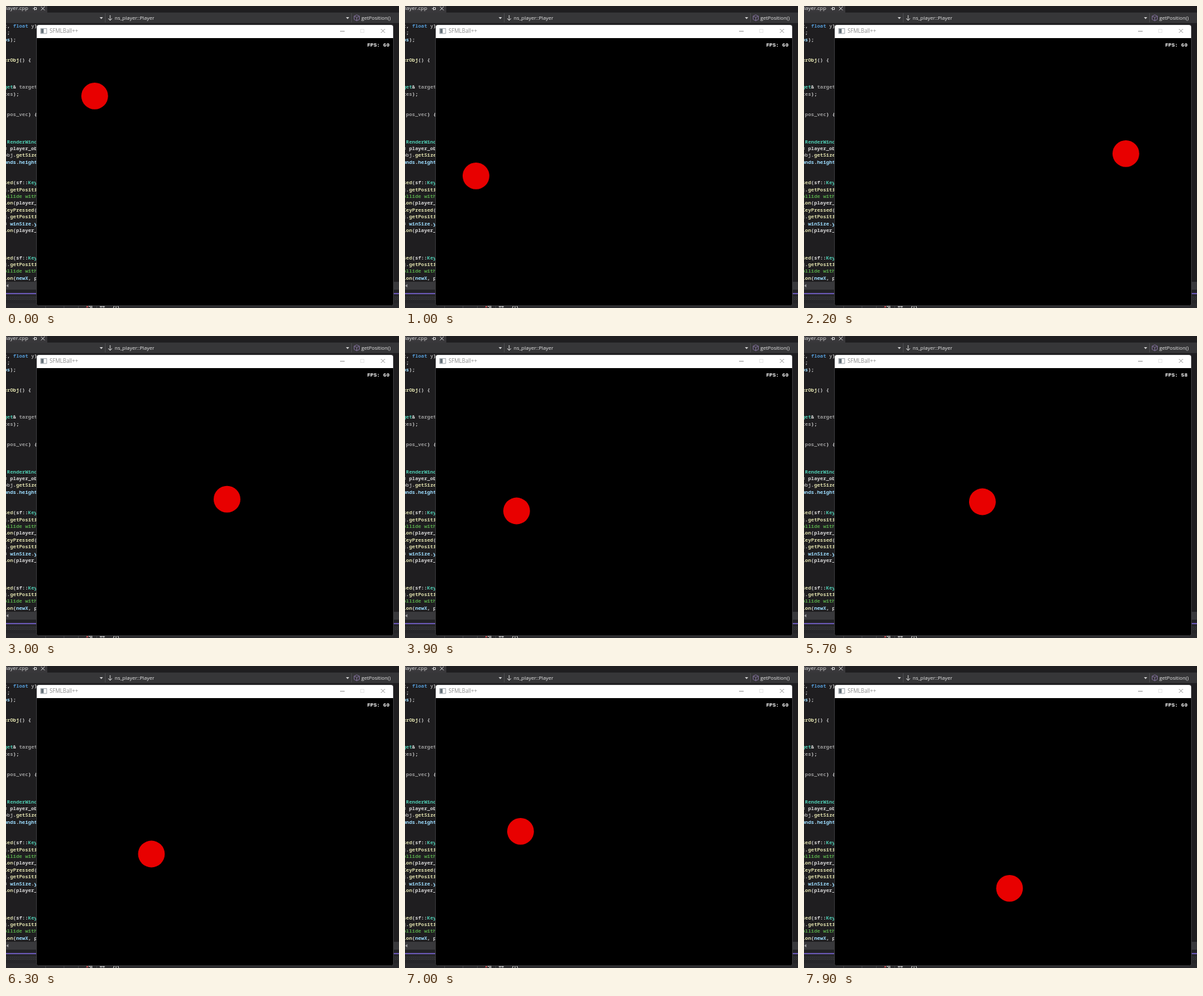
Animation of 600 by 461 pixels, one loop 8000 ms. Source, as an HTML page:

```html
<!DOCTYPE html>
<html lang="en">
<head>
<meta charset="utf-8">
<title>SFMLBall++</title>
<style>
html, body { margin: 0; width: 100%; height: 100%; overflow: hidden; background: #1f1e20; }
svg { display: block; width: 600px; height: 461px; }
text { white-space: pre; fill: #e6e6e6; font: 7.7px "Open Sans", "Noto Sans", sans-serif; }
#code text { font: 600 7.67px "Noto Sans Mono", "DejaVu Sans Mono", monospace; }
#fps { font: bold 8.1px "Liberation Mono", monospace; fill: #fff; }
.line { fill: none; stroke: #d6d6d6; stroke-width: 1; }
</style>
</head>
<body>
<svg viewBox="0 0 600 461">
  <defs>
    <pattern id="dots" width="3" height="3" patternUnits="userSpaceOnUse">
      <path d="M0 0h1v1h-1zM1.5 1.5h1v1h-1z" fill="#444448"/>
    </pattern>
  </defs>

  <!-- editor -->
  <rect width="600" height="461" fill="#1f1e20"/>
  <rect width="63" height="10" fill="#39383b"/>
  <rect y="10" width="600" height="16" fill="#363638"/>
  <path d="M151.500 11v14M527.500 11v14" stroke="#4b4b4e"/>
  <path d="M143 17h5l-2.500 3zM519 17h5l-2.500 3z" fill="#d0d0d0"/>
  <text x="-5" y="6.300" style="font-size:8px">player.cpp</text>
  <path class="line" d="M41 4h2.500M43.500 1.500v5M43.500 2.500h3v3h-3M53.500 1l5.500 5.500M59 1l-5.500 5.500"/>
  <path class="line" d="M159 14v8M156 19l3 3l3-3"/>
  <text x="166" y="21">ns_player::Player</text>
  <path d="M535.500 13.500l4 2v5l-4 2l-4-2v-5zM531.500 15.500l4 2l4-2M535.500 17.500v5" fill="none" stroke="#8f78ad" stroke-width=".8"/>
  <text x="542.500" y="21">getPosition()</text>
  <g id="code"></g>

  <!-- lower panels -->
  <rect y="421" width="600" height="12" fill="#39393c"/>
  <path d="M3.500 424.500v5l-3-2.500z" fill="#a5a5a8"/>
  <rect y="433" width="600" height="5" fill="#222225"/>
  <rect y="438" width="600" height="2" fill="#6655ad"/>
  <rect y="440" width="600" height="14" fill="#252528"/>
  <rect y="443" width="600" height="6" fill="url(#dots)"/>
  <rect y="454" width="600" height="7" fill="#2a2a2d"/>
  <path d="M60.500 456v5M88.500 456v5M110.500 456v5M138.500 456v5" stroke="#444448"/>
  <path class="line" d="M126 458.500h6M128 460.500h4M143 459h8M145 457.500v3M149 457.500v3M164 461a4 4 0 0 1 8 0M168 458v3"/>
  <path d="M122.500 457.500l3 3M125.500 457.500l-3 3" stroke="#d8565b"/>

  <!-- game window -->
  <rect x="46.500" y="28.500" width="545" height="429" rx="3" fill="#000" stroke="#3a3a3c"/>
  <path d="M47 49V32q0-3 3-3H588q3 0 3 3V49z" fill="#fff"/>
  <rect x="53" y="34.500" width="9" height="7.500" fill="#fff" stroke="#8a9298" stroke-width=".8"/>
  <rect x="53.500" y="35" width="4" height="6.500" fill="#66727a"/>
  <text x="66.500" y="41.300" style="font-size:8.200px;fill:#8c8c8c">SFMLBall++</text>
  <path d="M510 38.500h7M572.500 35l6 6M578.500 35l-6 6" stroke="#999" fill="none"/>
  <rect x="541.500" y="35.500" width="5" height="5" fill="none" stroke="#e8e8e8"/>
  <circle id="ball" r="20.400" fill="#e80000"/>
  <text id="fps" x="551.500" y="61.700"></text>
</svg>

<script>
const $ = id => document.getElementById(id);

// Each line: row, then segments led by a colour letter
const colors = { w: '#d8d8d8', y: '#dcdcaa', v: '#9cdcfe', t: '#4ec9b0', g: '#9a9a9a', c: '#57a64a', b: '#569cd6' };
const lines = [
  '0 gt|w, |bfloat|g y|w) {', '1 w);', '2 vos|w);', '5 yerObj|w() {',
  '9 tget|w& |gtarget', '10 gtes|w);', '13 g pos_vec|w) {',
  '17 w:|tRenderWind', '18 w= player_ob', '19 gobj|w.|ygetSize', '20 vunds|w.|vheight',
  '23 ysed|w(sf::|tKey', '24 wj.|ygetPositi', '25 collide with', '26 yion|w(player_',
  '27 yKeyPressed|w(', '28 wj.|ygetPositi', '29 w= |vwinSize|w.|vy', '30 yion|w(player_',
  '34 ysed|w(sf::|tKey', '35 wj.|ygetPositi', '36 collide with', '37 yion|w(|vnewX|w, p'
];
$('code').innerHTML = lines.map(line => {
  const gap = line.indexOf(' ');
  const spans = line.slice(gap + 1).split('|')
    .map(s => `<tspan fill="${colors[s[0]]}">${s.slice(1).replace('&', '&amp;')}</tspan>`);
  return `<text x="-3" y="${32.700 + 10.410 * line.slice(0, gap)}">${spans.join('')}</text>`;
}).join('');

// Ball route: tick, x, y
const route = [
  [0, 135.4, 137.4], [10, 108.4, 259.4], [22, 491.4, 225.4], [36, 222, 267], [39, 170.4, 267],
  [45, 215, 301], [50, 243, 329], [54, 262, 301], [57, 272.4, 253],
  [63, 222, 287], [70, 176.4, 252.4], [79, 313.8, 339.4]
];
const slowTicks = [5, 16, 25, 33, 42, 51, 57, 68, 76];

function draw(now) {
  const tick = Math.floor(now % 8000 / 100);
  const i = Math.max(1, route.findIndex(p => p[0] >= tick));
  const [a, b] = [route[i - 1], route[i]];
  const k = (tick - a[0]) / (b[0] - a[0]);
  $('ball').setAttribute('cx', a[1] + (b[1] - a[1]) * k);
  $('ball').setAttribute('cy', a[2] + (b[2] - a[2]) * k);
  $('fps').textContent = 'FPS: ' + (slowTicks.includes(tick) ? 58 : 60);
}

const start = performance.now();
function loop() {
  draw(performance.now() - start);
  requestAnimationFrame(loop);
}
loop();
</script>
</body>
</html>
```
